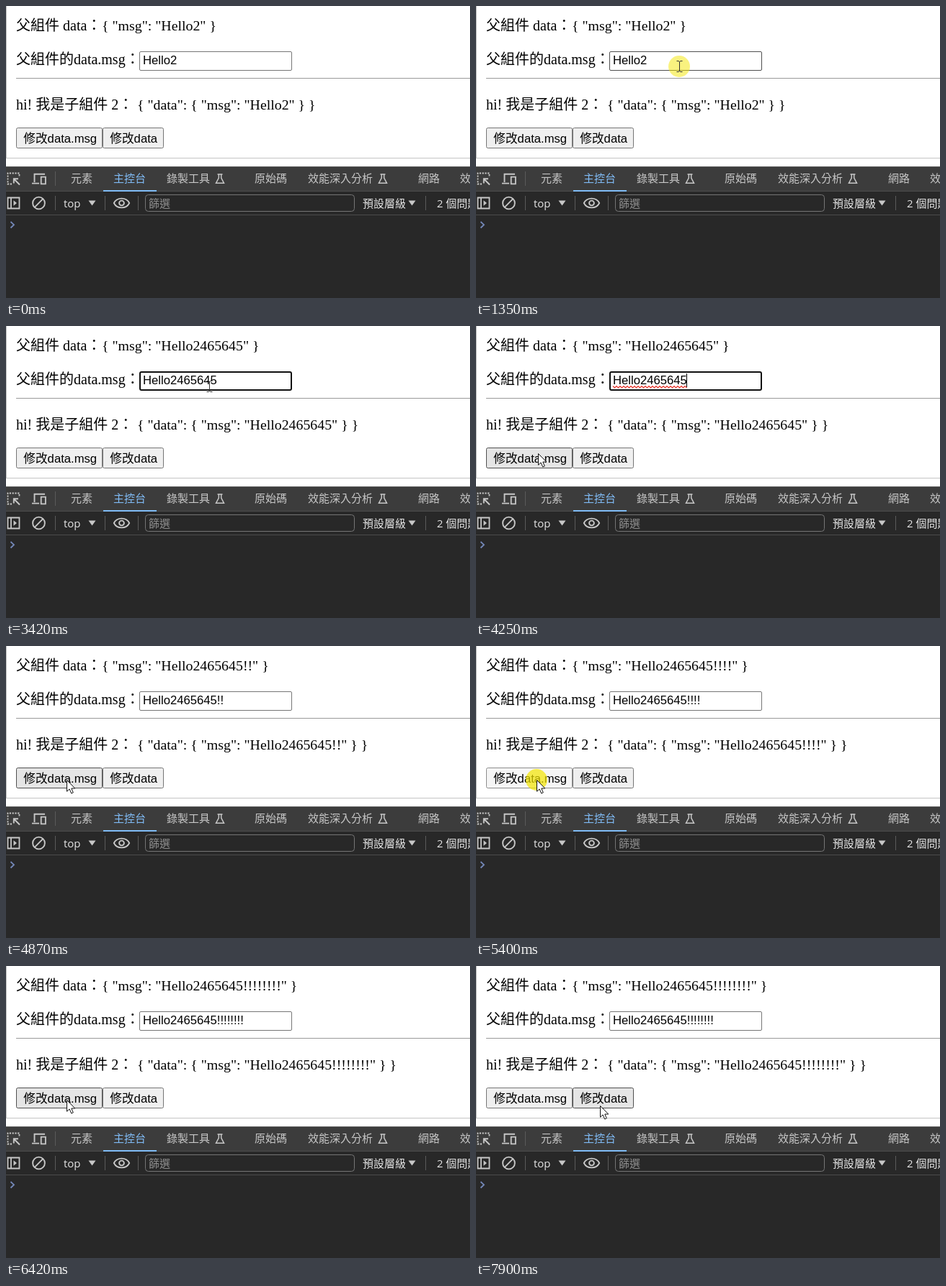
Animation, 644 px wide and 406 px high, one loop 8000 ms. Source, as an HTML page with a canvas:

```html
<!DOCTYPE html>
<html lang="zh-Hant">
<head>
<meta charset="utf-8">
<title>父組件 data</title>
<style>
  html, body { margin: 0; width: 100%; height: 100%; overflow: hidden; background: #fff; }
  canvas { display: block; }
</style>
</head>
<body>
<canvas id="stage" width="644" height="406"></canvas>
<script>
const ctx = document.getElementById('stage').getContext('2d');
const LOOP = 8000;
const CJK = '"Noto Sans CJK TC", "Noto Sans CJK", sans-serif';
const SERIF = '300 20px "Liberation Serif", ' + CJK;
const JSON_FONT = '19.85px "Liberation Serif", serif';
const FIELD = '300 16.667px "Liberation Sans", ' + CJK;
const TOOL = '15px "Open Sans", ' + CJK;

const input = { x: 185, y: 63, w: 212, h: 27 };
const msgButton = { x: 14, y: 169, w: 120, h: 29, label: '修改data.msg' };
const dataButton = { x: 134, y: 169, w: 85, h: 29, label: '修改data' };

// Pointer moves: start time, step count, cubic Bezier points.
const moves = [
  { at: 130, n: 5, p: [[389, 229], [340, 180], [270, 90], [245, 69]] },
  { at: 550, n: 8, p: [[246, 69], [255, 73], [270, 84], [282, 84]] },
  { at: 3420, n: 12, p: [[282, 84], [268, 20], [90, 60], [88, 164]] },
  { at: 4250, n: 3, p: [[86, 177], [86, 181], [85, 184], [84, 186]] },
  { at: 7080, n: 12, p: [[86, 185], [300, 55], [320, 105], [172, 196]] },
  { at: 7895, n: 1, p: [[172, 194], [172, 194], [172, 194], [172, 194]] }
];
const STEP = 68;

const typed = [[2230, '46'], [2360, '465'], [2620, '4656'], [2755, '46564'], [2890, '465645']];
const focus = [1415, 4540];
const caretOn = [[1415, 1950], [2230, 3420], [3950, 4540]];
const clicks = [4540, 4940, 5340, 6150];
const HOLD = 135;

const within = (t, [a, b]) => t >= a && t < b;
const inside = (p, r) => p && p[0] >= r.x && p[0] < r.x + r.w && p[1] >= r.y && p[1] < r.y + r.h;

function bezier([a, b, c, d], u) {
  const v = 1 - u;
  return [0, 1].map(i => a[i] * v ** 3 + 3 * b[i] * u * v * v + 3 * c[i] * u * u * v + d[i] * u ** 3);
}

function pointer(t) {
  const m = moves.filter(m => t >= m.at).pop();
  if (!m) return null;
  const k = Math.min(m.n - 1, Math.floor((t - m.at) / STEP));
  const u = m.n > 1 ? k / (m.n - 1) : 1;
  return bezier(m.p, u * u * (3 - 2 * u)).map(Math.round);
}

function message(t) {
  const keys = typed.filter(k => t >= k[0]).pop();
  const done = clicks.filter(c => t >= c + HOLD - 5).length;
  return 'Hello2' + (keys ? keys[1] : '') + '!!'.repeat(done);
}

function rect(x, y, w, h, color) {
  ctx.fillStyle = color;
  ctx.fillRect(x, y, w, h);
}

function text(s, x, y, font, color) {
  ctx.font = font;
  ctx.fillStyle = color;
  ctx.fillText(s, x, y);
}

function box(x, y, w, h, r, fill, line, width = 1) {
  const o = width / 2;
  ctx.beginPath();
  ctx.roundRect(x + o, y + o, w - width, h - width, r);
  if (fill) { ctx.fillStyle = fill; ctx.fill(); }
  if (line) { ctx.strokeStyle = line; ctx.lineWidth = width; ctx.stroke(); }
}

function stroke(d, color, width = 1.6) {
  ctx.strokeStyle = color;
  ctx.lineWidth = width;
  ctx.stroke(new Path2D(d));
}

function ring(x, y, r, color, width) {
  ctx.beginPath();
  ctx.arc(x, y, r, 0, 7);
  ctx.strokeStyle = color;
  ctx.lineWidth = width;
  ctx.stroke();
}

function fill(d, color) {
  ctx.fillStyle = color;
  ctx.fill(new Path2D(d));
}

function button(b, hover, pressed) {
  const [face, line] = pressed ? ['#f5f5f5', '#8d8d8d'] : hover ? ['#e5e5e5', '#4f4f4f'] : ['#efefef', '#767676'];
  box(b.x, b.y, b.w, b.h, 2, face, line);
  text(b.label, b.x + 10.3, 190, FIELD, '#000');
}

function squiggle(x, end, y) {
  ctx.beginPath();
  ctx.moveTo(x, y);
  for (let i = 1; x + i * 2.5 <= end; i++) ctx.lineTo(x + i * 2.5, y + (i % 2 ? 2.5 : 0));
  ctx.strokeStyle = '#e8281e';
  ctx.lineWidth = 1.1;
  ctx.stroke();
}

function page(t, pos) {
  const msg = message(t);
  const json = `{ "msg": "${msg}" }`;
  rect(0, 0, 644, 223, '#fff');
  rect(0, 0, 1, 212, '#c4c4c4');
  rect(0, 211, 644, 1, '#c4c4c4');
  text('父組件 data：', 14, 34, SERIF, '#000');
  text(json, 133, 34, JSON_FONT, '#000');
  text('父組件的data.msg：', 14, 81, SERIF, '#000');
  rect(14, 100, 630, 1, '#9a9a9a');
  text('hi! 我是子組件 2：', 14, 144, SERIF, '#000');
  text(`{ "data": ${json} }`, 182, 144, JSON_FONT, '#000');

  const { x, y, w, h } = input;
  if (within(t, focus)) box(x, y, w, h, 2, '#fff', '#101010', 2);
  else box(x, y, w, h, 1.5, '#fff', inside(pos, input) ? '#4f4f4f' : '#767676');
  text(msg, 190, 81, FIELD, '#000');
  const end = 190 + ctx.measureText(msg).width;
  if (within(t, [3700, focus[1]])) squiggle(190, end, 83.5);
  if (caretOn.some(c => within(t, c))) rect(Math.floor(end), 66, 1, 19, '#000');

  const pressed = clicks.some(c => within(t, [c, c + HOLD]));
  button(msgButton, inside(pos, msgButton), pressed);
  button(dataButton, inside(pos, dataButton), false);
}

function flask(x) {
  stroke(`M${x + 3} 234H${x + 10}M${x + 4.8} 234V239L${x + 1} 246.2H${x + 12}L${x + 8.2} 239V234`, '#c7c7c7', 1.5);
}

function devtools() {
  const ink = '#c7c7c7', light = '#e3e3e3', rule = '#5a5a5a', active = '#80bcf6';
  rect(0, 223, 644, 35, '#3c3c3c');
  rect(0, 223, 644, 1, '#5e5e5e');
  rect(0, 257, 644, 149, '#282828');
  rect(0, 257, 644, 1, '#4c4c4c');
  rect(0, 290, 644, 1, '#4c4c4c');
  rect(135, 256, 74, 2, active);

  // Tab bar
  ctx.setLineDash([2.2, 1.6]);
  stroke('M8 247.5H2.5V232.5H18.5V238', ink, 1.8);
  ctx.setLineDash([]);
  stroke('M19 248.5L11 240.5M10.8 246.5V240.2H17', ink, 1.9);
  stroke('M39.5 245V233.7H54M36 246.6H46', ink, 1.9);
  stroke('M48.7 237.7H54.9V247.3H48.7Z', ink, 1.8);
  rect(68, 230, 1, 20, rule);
  const tabs = [['元素', 90], ['錄製工具', 223], ['原始碼', 345], ['效能深入分析', 419], ['網路', 572], ['效能', 630]];
  for (const [name, x] of tabs) text(name, x, 245, TOOL, ink);
  text('主控台', 149, 245, TOOL, active);
  flask(290.5);
  flask(516.5);

  // Console toolbar
  stroke('M2.5 266.5H18.5V281.5H2.5ZM7 266.5V281.5', ink, 1.8);
  fill('M10.5 270.3L15 274L10.5 277.7Z', ink);
  ring(45.5, 274, 8.4, ink, 1.9);
  stroke('M39.7 279.8L51.3 268.2', ink, 1.9);
  text('top', 80, 279.5, TOOL, light);
  fill('M114.5 270.5H124.5L119.5 277.5Z', ink);
  stroke('M149.8 274C154 265.5 167 265.5 171.2 274C167 282.5 154 282.5 149.8 274Z', ink, 1.8);
  ring(160.5, 274, 3.4, ink, 1.9);
  for (const x of [68, 137, 183, 582]) rect(x, 264, 1, 20, rule);
  box(193, 262, 291, 24, 4, '#282828', '#757575');
  text('篩選', 198, 280, TOOL, '#8f8f8f');
  text('預設層級', 495, 280, TOOL, light);
  fill('M558.5 270.5H568.5L563.5 277.5Z', ink);
  text('2 個問題', 598, 280, TOOL, light);
  stroke('M6.5 300L11 304.2L6.5 308.5', '#7488b8', 1.8);
}

function halo(t, x, y) {
  const start = [1350, ...clicks].filter(c => t >= c).pop();
  const age = t - start;
  if (!(age < (start === 1350 ? 128 : 265))) return;
  ctx.beginPath();
  ctx.arc(x, y, 15, 0, 7);
  ctx.fillStyle = `rgba(244, 230, 0, ${Math.min(0.7, 0.5 + age / 300)})`;
  ctx.fill();
}

function cursor(t, [x, y]) {
  halo(t, x, y);
  const overText = inside([x, y], input) || inside([x, y], { x: 14, y: 126, w: 415, h: 24 });
  ctx.save();
  ctx.translate(x, y);
  if (overText) {
    const beam = 'M-3.5 -7.5H-1L.5 -6.5L2 -7.5H4.5M.5 -6.5V6.5M-3.5 7.5H-1L.5 6.5L2 7.5H4.5';
    stroke(beam, '#333', 1);
  } else {
    const arrow = 'M.5 .5V16.2L4.1 12.9L6.7 18.9L9.3 17.8L6.8 12H11.8Z';
    fill(arrow, '#fff');
    stroke(arrow, '#111', 1);
  }
  ctx.restore();
}

function draw(now) {
  const t = now % LOOP;
  const pos = pointer(t);
  page(t, pos);
  devtools();
  if (pos) cursor(t, pos);
  requestAnimationFrame(draw);
}
requestAnimationFrame(draw);
</script>
</body>
</html>
```
